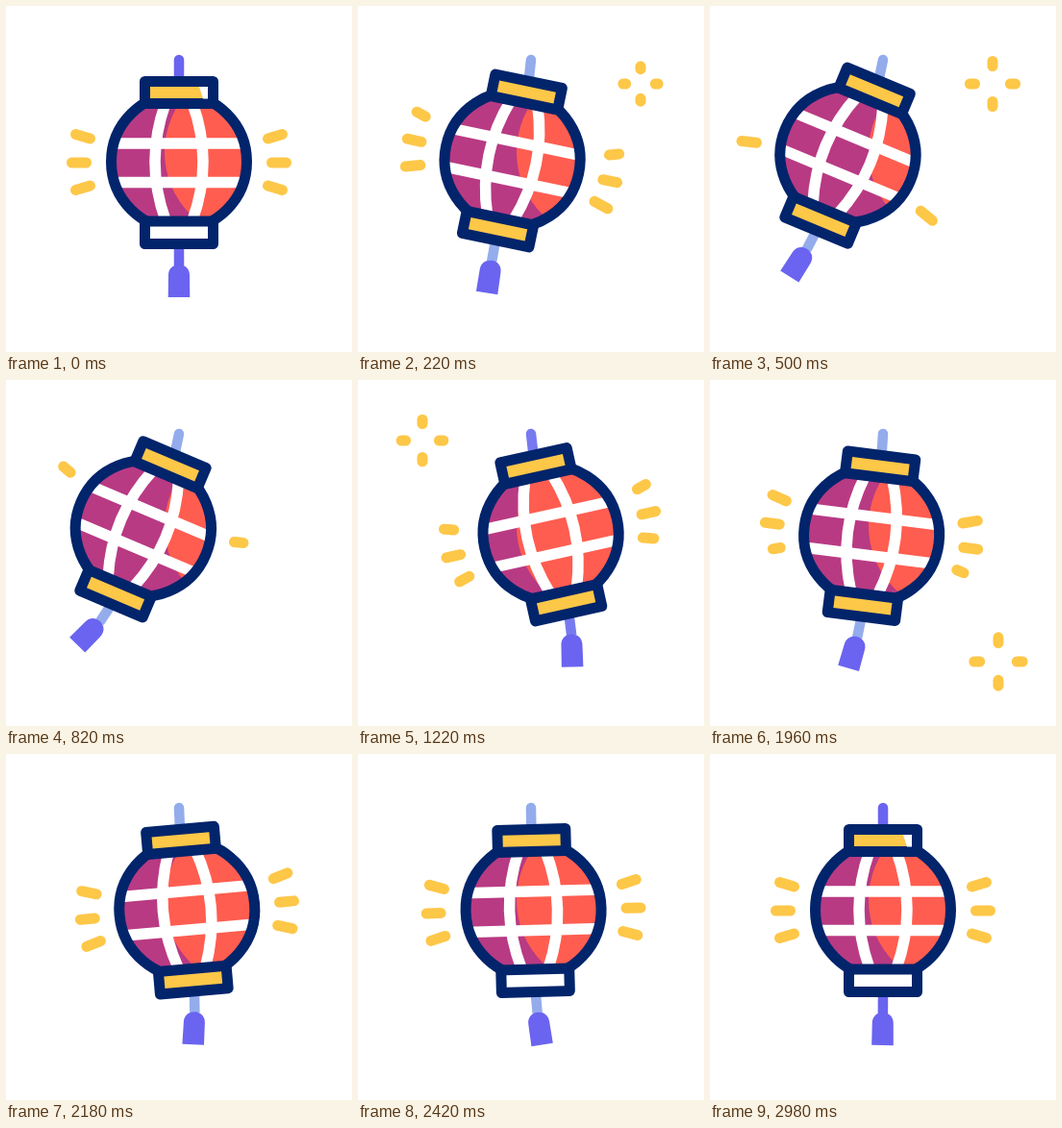
An HTML page with a canvas for the animation above (3 s loop, 360 px wide and 360 px high).

```html
<!DOCTYPE html>
<html lang="en">
<head>
<meta charset="utf-8">
<title>Swinging lantern</title>
<style>
  html, body { margin: 0; width: 100%; height: 100%; overflow: hidden; background: #fff; }
  canvas { display: block; width: 360px; height: 360px; }
</style>
</head>
<body>
<canvas id="stage"></canvas>
<script>
const LOOP = 3000, STEP = 20;
const NAVY = '#01246b', GOLD = '#fdc748', PURPLE = '#b83a83', ORANGE = '#ff5d50';
const VIOLET = [106, 100, 240], SKY = [148, 172, 236];
const PIVOT = 67;

const canvas = document.getElementById('stage');
const ratio = window.devicePixelRatio || 1;
canvas.width = canvas.height = 360 * ratio;
const ctx = canvas.getContext('2d');

const clamp = v => Math.max(0, Math.min(1, v));
const ramp = (t, from, span) => clamp((t - from) / span);
const mix = (a, b, p) => a + (b - a) * p;
const wave = p => (1 - Math.cos(p * Math.PI)) / 2;
const rad = deg => deg * Math.PI / 180;

// Peaks of the damped swing: time, degrees
const peaks = [[720, 25.5], [1370, -18], [1870, 9.5], [2220, -5.5], [2600, 1.8], [2960, 0]];

function swing(t) {
  if (t <= 0) return 0;
  const [first, top] = peaks[0];
  if (t < first) return top * Math.sin(t / first * Math.PI / 2);
  for (let i = 1; i < peaks.length; i++) {
    const [t0, a0] = peaks[i - 1], [t1, a1] = peaks[i];
    if (t < t1) return mix(a0, a1, wave((t - t0) / (t1 - t0)));
  }
  return 0;
}

// Turns a point of the resting lantern around the pivot
function turn(x, y, deg) {
  const c = Math.cos(rad(deg)), s = Math.sin(rad(deg));
  const dx = x - 180, dy = y - PIVOT;
  return [180 + dx * c - dy * s, PIVOT + dx * s + dy * c];
}

function line(x0, y0, x1, y1, width, color, cap = 'round') {
  ctx.beginPath();
  ctx.moveTo(x0, y0);
  ctx.lineTo(x1, y1);
  ctx.lineWidth = width;
  ctx.lineCap = cap;
  ctx.strokeStyle = color;
  ctx.stroke();
}

function cordColor(t) {
  const calm = 1 - ramp(t, 40, 140) + ramp(t, 2560, 220);
  const middle = 0.7 * ramp(t, 1020, 160) * (1 - ramp(t, 1300, 200));
  const p = clamp(calm + middle);
  return `rgb(${SKY.map((v, i) => Math.round(mix(v, VIOLET[i], p)))})`;
}

function drawTassel(t, angle, color) {
  const lean = 1.75 * swing(t - 130);
  const bend = rad((angle + lean) / 2);
  const [x, y] = turn(180, 250, angle);
  const ex = x - 20 * Math.sin(bend), ey = y + 20 * Math.cos(bend);
  line(x, y, ex, ey, 10.5, color, 'butt');

  ctx.save();
  ctx.translate(ex, ey);
  ctx.rotate(rad(lean));
  ctx.beginPath();
  ctx.moveTo(-11.3, 33);
  ctx.lineTo(-11, 10);
  ctx.bezierCurveTo(-11, 3, -6, -1, 0, -1);
  ctx.bezierCurveTo(6, -1, 11, 3, 11, 10);
  ctx.lineTo(11.3, 33);
  ctx.closePath();
  ctx.fillStyle = `rgb(${VIOLET})`;
  ctx.fill();
  ctx.restore();
}

function withSwing(angle, draw) {
  ctx.save();
  ctx.translate(180, PIVOT);
  ctx.rotate(rad(angle));
  ctx.translate(-180, -PIVOT);
  draw();
  ctx.restore();
}

function drawBand(y, height, fill) {
  ctx.beginPath();
  ctx.rect(144.5, y, 71, height);
  ctx.fillStyle = fill;
  ctx.fill();
  ctx.lineWidth = 11;
  ctx.lineJoin = 'round';
  ctx.strokeStyle = NAVY;
  ctx.stroke();
}

function drawLantern(t, angle) {
  const [cx, cy] = turn(180, 162, angle);

  // The shade edge stays put while the lantern passes beneath it
  ctx.save();
  ctx.beginPath();
  ctx.arc(cx, cy, 70, 0, 7);
  ctx.clip();
  ctx.fillStyle = PURPLE;
  ctx.fillRect(0, 0, 360, 360);
  ctx.beginPath();
  ctx.arc(257, 152, 92, 0, 7);
  ctx.rect(250, 60, 110, 200);
  ctx.fillStyle = ORANGE;
  ctx.fill();

  withSwing(angle, () => {
    for (const y of [143, 183.5]) line(105, y, 255, y, 11.5, '#fff', 'butt');
    for (const side of [-1, 1]) {
      ctx.beginPath();
      ctx.moveTo(180 + side * 14, 101);
      ctx.quadraticCurveTo(180 + side * 36, 162, 180 + side * 14, 223);
      ctx.lineWidth = 11.5;
      ctx.strokeStyle = '#fff';
      ctx.stroke();
    }
  });
  ctx.restore();

  withSwing(angle, () => {
    ctx.beginPath();
    ctx.arc(180, 162, 70.5, 0, 7);
    ctx.lineWidth = 11;
    ctx.strokeStyle = NAVY;
    ctx.stroke();

    const resting = t < 60 || t > 2680;
    drawBand(78.5, 23, GOLD);
    if (resting) {
      ctx.beginPath();
      ctx.moveTo(201, 84);
      ctx.lineTo(210, 84);
      ctx.lineTo(210, 96.5);
      ctx.lineTo(205, 96.5);
      ctx.closePath();
      ctx.fillStyle = '#fff';
      ctx.fill();
    }
    drawBand(224, 23.5, t < 60 || t > 2300 ? '#fff' : GOLD);
  });
}

// Rays: inner and outer end of the right-hand row
const rays = [[272.5, 138, 287.5, 133.5], [276.5, 163, 291.5, 163], [272.5, 187, 287.5, 191.5]];

function rayEnds(t, i) {
  const lag = i * 192;
  if (t < 740 + lag) return [ramp(t, 175 + lag, 130), 1];
  if (t < 1500 + lag) return [ramp(t, 1175 + lag, 130), ramp(t, 740 + lag, 130)];
  return [0, ramp(t, 1510 + lag, 130)];
}

function drawRays(t, angle) {
  withSwing(angle, () => {
    rays.forEach(([x0, y0, x1, y1], i) => {
      const [a, b] = rayEnds(t, i);
      if (b - a < 0.01) return;
      const width = 11 * Math.min(1, (b - a) * 4);
      for (const side of [-1, 1]) {
        const at = p => [180 + side * (mix(x0, x1, p) - 180), mix(y0, y1, p)];
        line(...at(a), ...at(b), width, GOLD);
      }
    });
  });
}

// Stars: centre, start, duration
const stars = [[294, 81, 50, 700], [67, 63, 860, 700], [300, 293, 1430, 700]];

function drawStar(t, [x, y, start, span]) {
  const p = (t - start) / span;
  if (p <= 0 || p >= 1) return;
  const far = p < 0.16 ? mix(9, 22.5, p / 0.16) : mix(22.5, 34, (p - 0.16) / 0.84);
  const near = p < 0.78 ? mix(8, 14, p / 0.78) : mix(14, 34, (p - 0.78) / 0.22);
  const width = Math.min(11, far - near);
  if (width <= 0) return;
  const a = near + width / 2, b = Math.max(a + 0.01, far - width / 2);
  for (const [dx, dy] of [[1, 0], [-1, 0], [0, 1], [0, -1]])
    line(x + dx * a, y + dy * a, x + dx * b, y + dy * b, width, GOLD);
}

function draw(t) {
  const angle = swing(t), color = cordColor(t);
  ctx.setTransform(ratio, 0, 0, ratio, 0, 0);
  ctx.fillStyle = '#fff';
  ctx.fillRect(0, 0, 360, 360);
  stars.forEach(s => drawStar(t, s));
  drawRays(t, angle);
  line(180, 56, ...turn(180, 79, angle), 10.5, color);
  drawTassel(t, angle, color);
  drawLantern(t, angle);
}

const begin = performance.now();
function tick() {
  const t = (performance.now() - begin) % LOOP;
  draw(t - t % STEP);
  requestAnimationFrame(tick);
}
tick();
</script>
</body>
</html>
```
